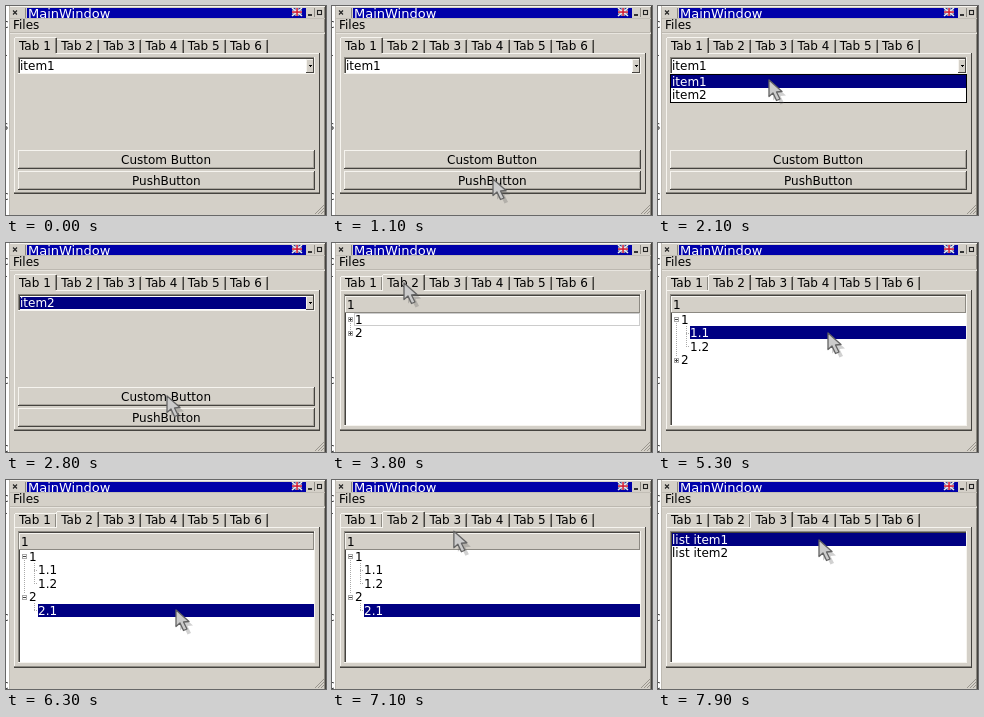
Write an HTML page with a canvas that moves like this. It is 320 px wide and 209 px high and loops after 8 s.

```html
<!DOCTYPE html>
<html lang="en">
<head>
<meta charset="utf-8">
<title>MainWindow</title>
<style>
html, body { margin: 0; width: 100%; height: 100%; overflow: hidden; background: #d4d0c8; }
canvas { display: block; }
</style>
</head>
<body>
<canvas id="stage" width="320" height="209"></canvas>
<script>
const ctx = document.getElementById('stage').getContext('2d');
const LOOP = 8000, STEP = 100;
const FACE = '#d4d0c8', LIGHT = '#f6f4ef', MID = '#8c8982', DARK = '#45433f';
const NAVY = '#000082', TITLE = '#0000aa', WHITE = '#fff', BLACK = '#000';

// Pointer path: time, x, y
const path = [
  [100, 300, 137], [600, 30, 40], [800, 30, 40], [1100, 161, 173],
  [1200, 161, 173], [1700, 61, 60], [2000, 61, 60], [2200, 161, 88],
  [2400, 161, 88], [2800, 161, 153], [3000, 161, 153], [3600, 72, 40],
  [3900, 72, 40], [4100, 93, 50], [4200, 93, 50], [4500, 18, 76],
  [4700, 18, 76], [5100, 170, 90], [5300, 170, 90], [5700, 18, 117],
  [5900, 18, 117], [6200, 170, 130], [6400, 170, 130], [7200, 115, 40],
  [7300, 115, 40], [7800, 161, 60], [8000, 161, 60]
];

function pointerAt(t) {
  const i = path.findIndex(p => p[0] > t);
  const [t0, x0, y0] = path[i - 1], [t1, x1, y1] = path[i];
  const k = (t - t0) / (t1 - t0);
  return [x0 + (x1 - x0) * k, y0 + (y1 - y0) * k];
}

function box(x, y, w, h, color) {
  ctx.fillStyle = color;
  ctx.fillRect(x, y, w, h);
}

function bevel(x, y, w, h, top, bottom) {
  box(x, y, w, 1, top);
  box(x, y, 1, h, top);
  box(x, y + h - 1, w, 1, bottom);
  box(x + w - 1, y, 1, h, bottom);
}

function text(s, x, y, color = BLACK, size = 12) {
  ctx.font = size + 'px "DejaVu Sans", sans-serif';
  ctx.fillStyle = color;
  ctx.fillText(s, x, y);
}

function row(s, x, y, left, selected) {
  if (selected) box(left, y - 11, 308 - left, 13, NAVY);
  text(s, x, y, selected ? WHITE : BLACK);
}

function edgeStrip(t) {
  box(0, 0, 4, 209, WHITE);
  ctx.save();
  ctx.beginPath();
  ctx.rect(0, 0, 3, 209);
  ctx.clip();
  const marks = t < 2300
    ? [['c', 22], ['r', 56], [':', 90], ['s', 124], [':', 159], ['c', 194]]
    : [['c', 22], ['r', 40], ['-', 74], ['-', 104], ['c', 141], ['c', 209]];
  for (const [s, y] of marks) text(s, -4, y, '#333');
  ctx.restore();
  box(3, 0, 1, 209, '#bdb9b1');
}

function flag(x, y) {
  box(x, y, 10, 8, '#24358c');
  ctx.lineWidth = 1.6;
  ctx.strokeStyle = '#eee';
  ctx.beginPath();
  ctx.moveTo(x, y); ctx.lineTo(x + 10, y + 8);
  ctx.moveTo(x + 10, y); ctx.lineTo(x, y + 8);
  ctx.stroke();
  box(x + 3.5, y, 3, 8, '#eee');
  box(x, y + 2.5, 10, 3, '#eee');
  box(x + 4.3, y, 1.5, 8, '#d01830');
  box(x, y + 3.3, 10, 1.5, '#d01830');
}

function frame() {
  box(4, 0, 316, 209, FACE);
  box(4, 0, 316, 1, LIGHT);
  box(318, 1, 1, 208, MID);
  box(319, 0, 1, 209, DARK);
  box(21, 2, 279, 10, TITLE);
  text('MainWindow', 22, 11.5, WHITE, 13);
  flag(286, 2);

  ctx.strokeStyle = '#222';
  ctx.lineWidth = 1.1;
  ctx.beginPath();
  ctx.moveTo(7, 4.5); ctx.lineTo(11, 8.5);
  ctx.moveTo(11, 4.5); ctx.lineTo(7, 8.5);
  ctx.stroke();
  box(19, 2, 1, 10, MID);
  box(302, 8, 4, 2, '#333');
  box(308, 2, 1, 9, MID);
  ctx.strokeRect(311.5, 4.5, 4, 4);
  box(4, 12, 315, 1, '#c2beb6');

  text('Files', 7, 23);
  box(4, 26, 315, 1, '#bcb8b0');
  box(4, 27, 315, 1, '#e8e5df');

  ctx.strokeStyle = '#99958d';
  ctx.lineWidth = 1;
  ctx.beginPath();
  for (const d of [3, 6, 9]) {
    ctx.moveTo(318 - d, 208);
    ctx.lineTo(318, 208 - d);
  }
  ctx.stroke();
}

function tabs(current) {
  bevel(8, 47, 306, 140, LIGHT, MID);
  box(8, 187, 306, 1, DARK);
  box(313, 47, 1, 141, DARK);
  for (let i = 0; i < 6; i++) {
    const x = 9 + i * 42.2, on = i === current, y = on ? 31 : 33;
    const l = Math.round(x), r = Math.round(x + 41);
    if (on) box(l, 46, r - l, 3, FACE);
    box(l, y, r - l, 1, LIGHT);
    if (on || !i) box(l - 1, y + 1, 1, 47 - y, LIGHT);
    box(r - 1, y + 1, 1, 46 - y, MID);
    box(r, y + 1, 1, 46 - y, DARK);
    text('Tab ' + (i + 1), x + 4, 44);
  }
}

function button(s, x, y, down) {
  bevel(12, y, 297, 19, down ? DARK : LIGHT, down ? LIGHT : DARK);
  bevel(13, y + 1, 295, 17, down ? MID : FACE, down ? FACE : '#aaa69e');
  text(s, x + (down ? 1 : 0), y + 14 + (down ? 1 : 0));
}

function sunken(h) {
  box(12, 51, 297, h, WHITE);
  bevel(12, 51, 297, h, MID, LIGHT);
  box(13, 52, 295, 1, DARK);
  box(13, 52, 1, h - 2, DARK);
}

function formPage(t) {
  button('Custom Button', 115, 144, t >= 2900 && t < 3100);
  button('PushButton', 126, 165, false);
  sunken(17);
  const picked = t >= 2500;
  if (picked) box(14, 54, 286, 12, NAVY);
  text(picked ? 'item2' : 'item1', 14, 64, picked ? WHITE : BLACK);
  box(300, 53, 8, 14, FACE);
  bevel(300, 53, 8, 14, LIGHT, DARK);
  box(303, 59, 3, 1, BLACK);
  box(304, 60, 1, 1, BLACK);
  if (t >= 1900 && t < 2500) {
    box(12, 68, 297, 29, BLACK);
    box(13, 69, 295, 27, WHITE);
    const second = t >= 2200;
    row('item1', 14, 80, 13, !second);
    row('item2', 14, 93, 13, second);
  }
}

function expander(y, open) {
  box(16, y - 2, 5, 5, '#aaa');
  box(17, y - 1, 3, 3, WHITE);
  box(17, y, 3, 1, '#444');
  if (!open) box(18, y - 1, 1, 3, '#444');
}

function dots(x, y, w, h) {
  for (let d = 0; d < Math.max(w, h); d += 2)
    box(x + (w > h ? d : 0), y + (w > h ? 0 : d), 1, 1, '#aaa');
}

function treePage(t) {
  const first = t >= 4600, second = t >= 5800;
  sunken(132);
  box(13, 53, 295, 17, FACE);
  bevel(13, 53, 295, 17, LIGHT, MID);
  text('1', 15, 66);
  if (!first) bevel(22, 70, 286, 13, '#ccc', '#ccc');
  dots(18, 80, 1, first ? 34 : 7);
  expander(76, first);
  row('1', 23, 81, 22, false);
  if (first) {
    dots(28, 83, 1, 21);
    dots(28, 90, 4, 1);
    dots(28, 103, 4, 1);
    row('1.1', 32, 94, 32, t >= 5100 && t < 6300);
    row('1.2', 32, 108, 32, false);
  }
  const y = first ? 121 : 94;
  expander(y - 4, second);
  row('2', 23, y, 22, false);
  if (second) {
    dots(28, 123, 1, 8);
    dots(28, 130, 4, 1);
    row('2.1', 32, 135, 32, t >= 6300);
  }
}

function listPage(t) {
  sunken(132);
  row('list item1', 14, 64, 14, t >= 7900);
  row('list item2', 14, 77, 14, false);
}

function pointer([x, y]) {
  const arrow = new Path2D('M0 0V16.5L4 13L7.5 20.5L11 19L7.5 12L13 11.5Z');
  ctx.save();
  ctx.translate(x + 4, y + 4);
  ctx.fillStyle = 'rgba(90,90,90,.28)';
  ctx.fill(arrow);
  ctx.translate(-4, -4);
  ctx.fillStyle = '#cbcbcb';
  ctx.fill(arrow);
  ctx.lineWidth = 1.3;
  ctx.lineJoin = 'round';
  ctx.strokeStyle = '#636363';
  ctx.stroke(arrow);
  ctx.restore();
}

function draw(now) {
  const t = Math.floor(now % LOOP / STEP) * STEP;
  const page = t < 3700 ? 0 : t < 7300 ? 1 : 2;
  edgeStrip(t);
  frame();
  tabs(page);
  [formPage, treePage, listPage][page](t);
  if (t >= 100) pointer(pointerAt(t));
}

let start;
function tick(now) {
  start ??= now;
  draw(now - start);
  requestAnimationFrame(tick);
}
draw(0);
requestAnimationFrame(tick);
</script>
</body>
</html>
```
